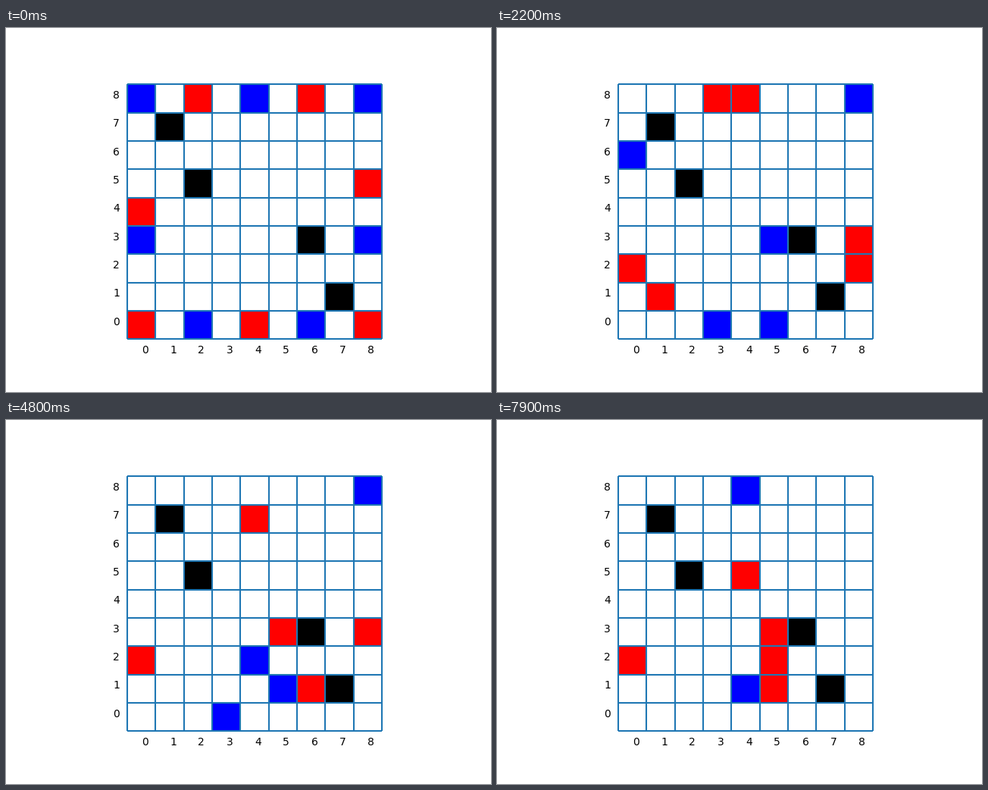
A matplotlib script that plays this animation: 640 by 480 pixels, repeating every 8 s.

```python
import matplotlib.pyplot as plt
from matplotlib.animation import FuncAnimation
from matplotlib.patches import Rectangle

N = 9
STEPS = 80

# Key cells (column, row) of each walk, taken in turn by either side.
WALKS = {
    "blue": "20-30 60-50 83-73 03-13-12 73-72-52-53 08-06-46 53-51-41 "
            "50-51 41-44-42 42-44-42-43 30-30 30-50 88-58-68-48 50-40-41",
    "red": "85-84 80-82 04-02 84-83 00-01-11 68-58 28-38 58-48 48-47 "
           "38-48 11-31 82-62-61 47-57-56 48-47 56-53 53-52-53 47-43 "
           "83-85-55 61-51 53-52 43-53 55-45",
}


def setup():
    board = {}
    for x in range(0, N, 2):
        board[x, 8] = "red" if x % 4 else "blue"
        board[x, 0] = "blue" if x % 4 else "red"
    board[0, 3] = board[8, 3] = "blue"
    board[0, 4] = board[8, 5] = "red"
    for x, y in [(1, 7), (2, 5)]:
        board[x, y] = board[N - 1 - x, N - 1 - y] = "black"
    return board


def moves(side):
    """Yield the single-cell moves along each walk; equal keys mean a pass."""
    for walk in WALKS[side].split():
        keys = [(int(k[0]), int(k[1])) for k in walk.split("-")]
        for (x0, y0), (x1, y1) in zip(keys, keys[1:]):
            n = abs(x1 - x0) + abs(y1 - y0) or 1
            dx, dy = (x1 - x0) // n, (y1 - y0) // n
            for i in range(n):
                a = (x0 + i * dx, y0 + i * dy)
                yield a, (a[0] + dx, a[1] + dy)


def capture(board, side):
    """Remove every enemy piece that touches two or more of side's pieces."""
    enemy = "red" if side == "blue" else "blue"
    lost = []
    for (x, y), color in board.items():
        around = [(x + 1, y), (x - 1, y), (x, y + 1), (x, y - 1)]
        if color == enemy and sum(board.get(c) == side for c in around) > 1:
            lost.append((x, y))
    for cell in lost:
        del board[cell]


def play():
    board = setup()
    history = [dict(board)]
    queue = {side: moves(side) for side in WALKS}
    for step in range(1, STEPS):
        side = "blue" if step % 2 else "red"
        start, end = next(queue[side])
        board[end] = board.pop(start)
        capture(board, side)
        history.append(dict(board))
    return history


history = play()

fig = plt.figure(figsize=(6.4, 4.8), dpi=100)
ax = fig.add_subplot()
ax.axis("off")
ax.set_aspect("equal")
pad = 0.05 * N
ax.set(xlim=(-pad, N + pad), ylim=(-pad, N + pad))

cells = {(x, y): ax.add_patch(Rectangle((x, y), 1, 1, fc="white", lw=0))
         for x in range(N) for y in range(N)}
ax.vlines(range(N + 1), 0, N, color="C0", lw=1.5, zorder=2)
ax.hlines(range(N + 1), 0, N, color="C0", lw=1.5, zorder=2)
for i in range(N):
    ax.text(i + 0.5, -0.5, str(i))
    ax.text(-0.5, i + 0.5, str(i))


def draw(step):
    for pos, cell in cells.items():
        cell.set_facecolor(history[step].get(pos, "white"))
    return list(cells.values())


anim = FuncAnimation(fig, draw, frames=STEPS, interval=100,
                     repeat=True, repeat_delay=0)
plt.show()
```
